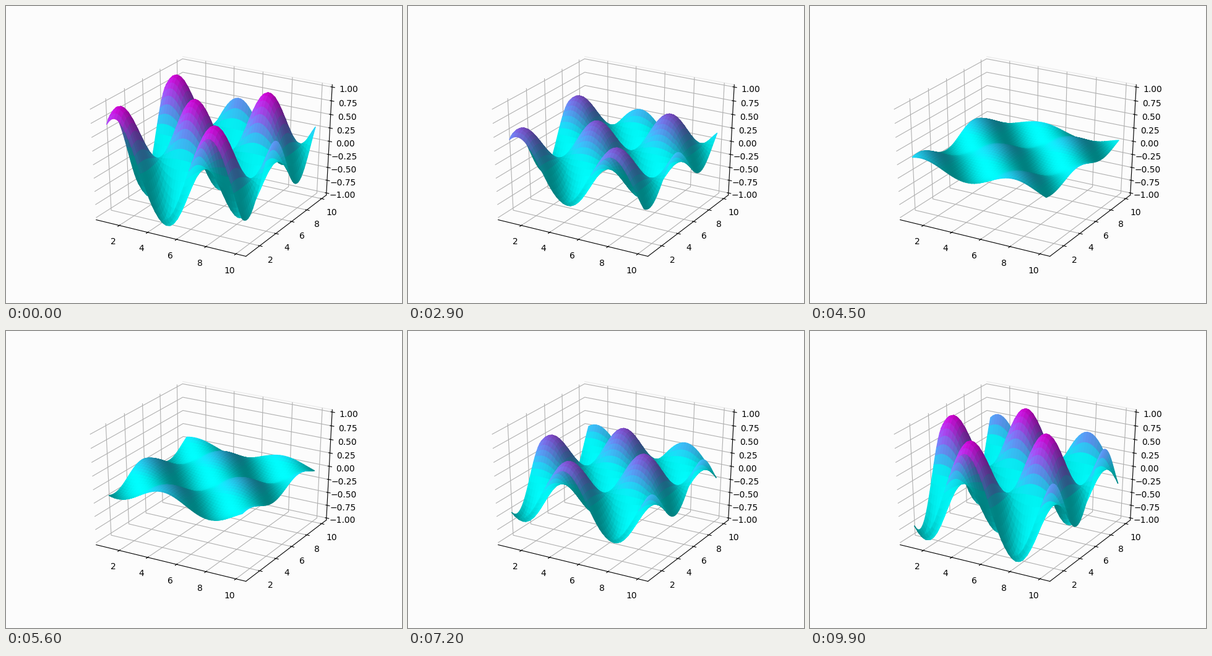
Animation of 640x480 px, one loop 10 s. Source, as a matplotlib script:

```python
import numpy as np
import matplotlib.pyplot as plt
from matplotlib.animation import FuncAnimation
from mpl_toolkits.mplot3d.art3d import Poly3DCollection

FRAMES, INTERVAL = 100, 100
LIGHT = np.array([-1, -1, 0.5])
BACK = "#fcfcfc"

cool = plt.get_cmap("cool")
side = np.linspace(1, 10, 50)
X, Y = np.meshgrid(side, side)
WAVE = np.sin(X) * np.sin(Y)


def padded(lo, hi):
    pad = (hi - lo) / 48
    return lo - pad, hi + pad


def cells(a):
    """Corner values of every grid cell, in drawing order."""
    corners = a[:-1, :-1], a[:-1, 1:], a[1:, 1:], a[1:, :-1]
    return np.stack([c.ravel() for c in corners], axis=1)


def shaded(verts, colors):
    """Darken faces by their angle to the light, scaled to the full range."""
    normals = np.cross(verts[:, 0] - verts[:, 1], verts[:, 1] - verts[:, 2])
    normals /= np.linalg.norm(normals, axis=1, keepdims=True)
    shade = normals @ LIGHT
    span = np.ptp(shade)
    level = (shade - shade.min()) / span if span else np.zeros_like(shade)
    out = colors.copy()
    out[:, :3] *= (0.5 + 0.5 * level)[:, None]
    return out


def surface(i):
    z = np.cos(np.pi * i / FRAMES) * WAVE
    verts = np.stack([cells(X), cells(Y), cells(z)], axis=-1)
    return verts, shaded(verts, cool(z[:-1, :-1].ravel()))


fig = plt.figure(figsize=(6.4, 4.8), dpi=100, facecolor=BACK)
ax = fig.add_subplot(projection="3d", facecolor=BACK)

# Let the cube stretch to the whole subplot area.
ax.apply_aspect = lambda position=None: None
ax.set_position([0.125, 0.11, 0.775, 0.77])
ax.set_box_aspect((1, 1, 1), zoom=np.sqrt(3) / 1.8294640721620434)
ax.view_init(elev=30, azim=-60)

ax.set_xlim(padded(0.55, 10.45))
ax.set_ylim(padded(0.55, 10.45))
ax.set_zlim(padded(-1, 1))
ax.set_xticks(range(2, 11, 2))
ax.set_yticks(range(2, 11, 2))
ax.set_zticks(np.linspace(-1, 1, 9))
for axis, edge in (ax.xaxis, BACK), (ax.yaxis, "#ececec"), (ax.zaxis, BACK):
    axis.set_pane_color(BACK, 1)
    axis.pane.set_edgecolor(edge)

verts, colors = surface(0)
mesh = Poly3DCollection(verts, facecolors=colors, edgecolors=colors, linewidths=1)
ax.add_collection3d(mesh)


def update(i):
    verts, colors = surface(i)
    mesh.set_verts(verts)
    mesh.set_facecolor(colors)
    mesh.set_edgecolor(colors)
    return (mesh,)


anim = FuncAnimation(fig, update, frames=FRAMES, interval=INTERVAL,
                     repeat=True, repeat_delay=0, blit=False)
plt.show()
```
